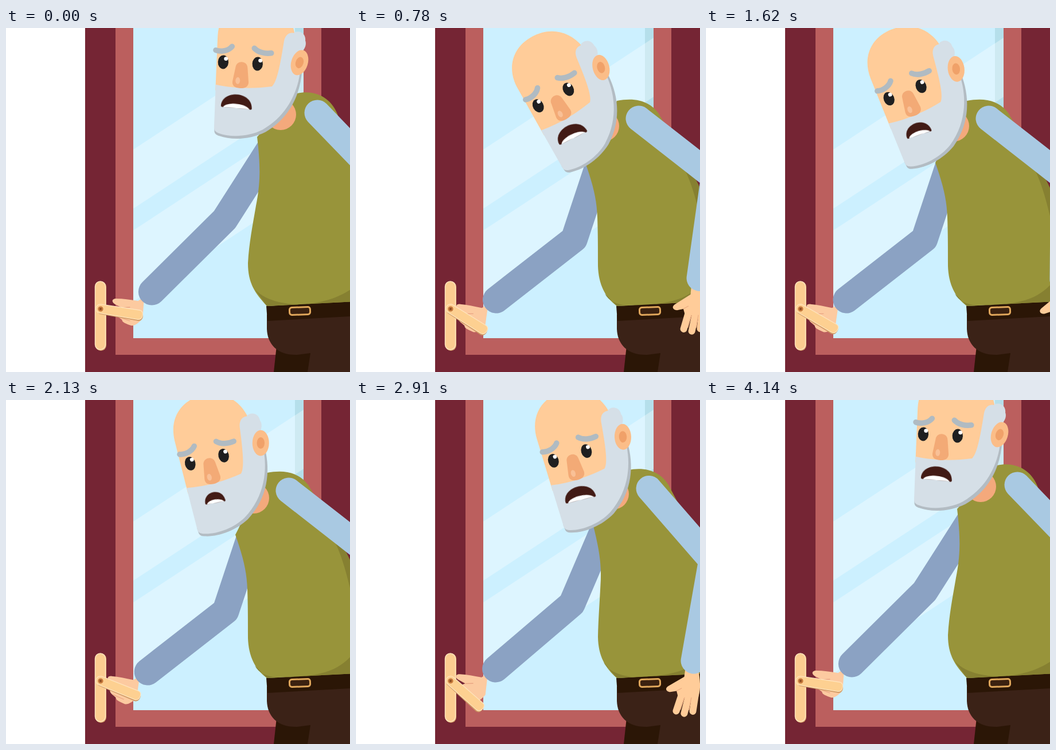
Recreate the animation shown at these times as an HTML page without scripts. Size 600 by 600 pixels, loop 4.17 s.

```html
<!DOCTYPE html>
<html lang="en">
<head>
<meta charset="utf-8">
<title>Man at the door</title>
<style>
/* Six animated controls drive the whole rig. */
@property --lean { syntax: "<number>"; inherits: true; initial-value: 0; }
@property --turn { syntax: "<number>"; inherits: true; initial-value: 1; }
@property --push { syntax: "<number>"; inherits: true; initial-value: 8.5; }
@property --nod { syntax: "<angle>"; inherits: true; initial-value: 3deg; }
@property --upper { syntax: "<angle>"; inherits: true; initial-value: 46deg; }
@property --fore { syntax: "<angle>"; inherits: true; initial-value: 88deg; }

@keyframes lean { 0%, 81%, 100% { --lean: 0 } 16.6%, 62% { --lean: 1 } }
@keyframes turn { 0%, 100% { --turn: 1 } 22%, 81% { --turn: 0 } }
@keyframes push { 0%, 81%, 100% { --push: 8.5 } 27% { --push: 38 } 51% { --push: 21.5 } 70% { --push: 41 } }
@keyframes nod { 0%, 100% { --nod: 3deg } 15%, 27% { --nod: -28.7deg } 51% { --nod: -13.6deg } 70% { --nod: -16.3deg } 81% { --nod: -1.9deg } }
@keyframes upper { 0%, 100% { --upper: 46deg } 15%, 52% { --upper: 38deg } 70%, 81% { --upper: 49deg } }
@keyframes fore { 0%, 100% { --fore: 87deg } 10%, 27% { --fore: 98deg } 51% { --fore: 83deg } 70%, 81% { --fore: 100deg } }

@keyframes torso {
  0%, 81%, 100% { d: path("M438 190C444 240 444 270 436 310C430 345 424 375 422 410C422 445 434 462 455 485L610 477L610 300L600 210L578 150C565 118 535 108 508 114Z") }
  16.6%, 62% { d: path("M400 235C414 275 420 300 421 330C422 360 422 385 422 415C423 448 435 470 455 485L610 477L610 300L580 238L527 148C510 126 485 121 455 127Z") }
}
@keyframes belly {
  0%, 81%, 100% { d: path("M428 447C445 477 490 483 520 482C560 478 585 468 610 450L610 477L455 485Z") }
  16.6%, 62% { d: path("M434 463C440 476 455 482 472 484C550 482 580 475 610 437L610 477L455 485Z") }
}
@keyframes reach {
  0%, 81%, 100% { d: path("M249 460L376 334L459 204") }
  16.6%, 62% { d: path("M245 474L381 368L434 208") }
}
@keyframes mouth { 0%, 27%, 70%, 100% { transform: none } 51% { transform: scale(.66, .8) } }

html, body { margin: 0; width: 100%; height: 100%; overflow: hidden; background: #fff; }
svg { display: block; width: 100vw; height: 100vh; }
svg, .morph { animation: 4.17s cubic-bezier(.37, 0, .63, 1) infinite; }
svg { animation-name: lean, turn, push, nod, upper, fore; }
.torso { animation-name: torso; fill: #98943a; }
.belly { animation-name: belly; }
.reach { animation-name: reach; stroke: #8ba2c3; stroke-width: 47; }
.mouth { animation-name: mouth; }

.grip { transform: translateX(calc((30 - var(--push)) * .25px)); }
.far-hand { transform: translate(calc(249px - 4px * var(--lean)), calc(460px + 14px * var(--lean))) rotate(calc(4deg * var(--lean))); }
.lever { transform: translate(165px, 490px) rotate(calc(var(--push) * 1deg)); }
.back { transform: translateX(calc(45px - 45px * var(--lean))); }
.arm { transform: translate(calc(543px - 50px * var(--lean)), calc(148px + 10px * var(--lean))) rotate(var(--upper)); }
.forearm { transform: translateX(166px) rotate(calc(var(--fore) - var(--upper))); }
.near-hand { transform: translateX(178px) rotate(-99deg); }
.neck { transform: translate(calc(479px - 47px * var(--lean)), calc(151px + 20px * var(--lean))); }
.head { transform: translate(calc(479.5px - 66.5px * var(--lean) - 14px * var(--turn)), calc(107px + 26px * var(--lean))) rotate(var(--nod)) translate(-54px, -43px); }
.face { transform: translateX(calc(-5px * var(--turn))); }

.limb, .brow, .finger { fill: none; stroke-linecap: round; stroke-linejoin: round; }
.sleeve { stroke: #a9c9e2; stroke-width: 45; }
.brow { stroke: #b0bbc2; stroke-width: 9.5; }
.finger { stroke: #ffcc99; stroke-width: 12; }
.skin { fill: #ffcc99; }
.blush { fill: #f3aa76; }
.shade { fill: #868031; }
.dark { fill: #2b1606; }
</style>
</head>
<body>
<svg viewBox="0 0 600 600">
  <defs>
    <g id="eye">
      <ellipse rx="9.2" ry="12" fill="#1f1f20"/>
      <circle cx="4.5" cy="-6" r="3.4" fill="#fff"/>
    </g>
  </defs>

  <!-- door -->
  <path fill="#752534" d="M138 0H600V600H138Z"/>
  <path fill="#bb5f5e" d="M191 0H550V570H191Z"/>
  <path fill="#ccf0ff" d="M222 0H519V541H222Z"/>
  <path fill="#b5dfeb" d="M504 0H519V541H504Z"/>
  <path fill="#fff" opacity=".33" d="M222 212L519 17V120L222 315ZM222 353L519 158V282L222 477Z"/>
  <rect x="156" y="442" width="19" height="121" rx="9.5" fill="#dba56c"/>
  <rect x="155.5" y="442" width="18" height="119" rx="9" fill="#fbcd90" stroke="#ffe4bd" stroke-width="1.5"/>

  <!-- far arm -->
  <g class="grip">
    <g class="far-hand">
      <path fill="#fccaa0" d="M-9 6L-24 16C-38 14 -50 12 -62 12C-70 12 -71 18 -64 22L-52 28C-64 32 -66 38 -60 43L-52 49C-52 54 -44 56 -36 59C-30 60 -22 54 -16 46L-14 18Z"/>
      <path fill="none" stroke="#e9a582" stroke-width="1.3" d="M-52 28L-38 27M-58 44L-38 51"/>
    </g>
    <path class="limb morph reach" d="M249 460L376 334L459 204"/>
  </g>

  <!-- lever -->
  <g class="lever">
    <path fill="#cf9963" d="M-1 -6H68Q75 -6 75 2T68 11L0 9A8 8 0 0 1 -1 -6Z"/>
    <path fill="#fdd091" stroke="#ffe4bd" stroke-width="1.3" d="M-1 -8H67Q74 -8 74 0T67 8.5L0 7.5A7.7 7.7 0 0 1 -1 -8Z"/>
    <circle r="4.6" fill="#c67a3d"/>
    <circle r="2" fill="#8a4a20"/>
  </g>

  <!-- trousers and belt -->
  <path class="dark" d="M473 545L467 600H540V545Z"/>
  <path fill="#3b2217" d="M455 500V525C456 552 474 571 508 570L531 567L526 600H600V490Z"/>
  <path class="dark" d="M454 485L600 476V503L456 511Z"/>
  <rect x="494.5" y="487" width="36" height="13" rx="4" fill="#3b2110" stroke="#dfa65b" stroke-width="3" transform="rotate(-2 512 493)"/>

  <!-- torso -->
  <path class="morph torso" d="M438 190C444 240 444 270 436 310C430 345 424 375 422 410C422 445 434 462 455 485L610 477L610 300L600 210L578 150C565 118 535 108 508 114Z"/>
  <path class="morph belly shade" d="M428 447C445 477 490 483 520 482C560 478 585 468 610 450L610 477L455 485Z"/>
  <path class="back shade" d="M566 232C584 265 592 295 601 332L610 300L580 238Z"/>

  <!-- near arm -->
  <g class="arm">
    <g class="forearm">
      <g class="near-hand">
        <path class="skin" d="M-14 10L-16 28L-44 45C-50 49 -47 55 -40 55L-29 53L-26 64L8 66C14 50 12 36 8 12Z"/>
        <path class="finger" d="M-19 56L-29 88M-7 58L-15 92M4 58L0 88"/>
        <path fill="none" stroke="#eeb084" stroke-width="1.4" d="M-15 64L-22 86M-3 64L-7 86M-29 53L-20 48"/>
      </g>
      <path class="limb sleeve" d="M0 0H178"/>
    </g>
    <path class="limb sleeve" d="M0 0H166"/>
  </g>

  <circle class="neck" r="27" fill="#f4a97c"/>

  <!-- head, centred between the eyes -->
  <g class="head">
    <path fill="#b3bcc3" d="M-45 112L-44 122C-43 126 -40 128 -35 129C-12 136 20 132 45 118C88 90 103 46 103 5H80L0 100Z"/>
    <path class="skin" d="M-46 50L-47 -45C-47 -85 -20 -111 18 -111C55 -111 80 -88 87 -55V50Z"/>
    <path fill="#d5dfe7" d="M-46 40C-10 46 25 43 52 38C60 30 64 5 69 -42C71 -54 78 -58 85 -57C93 -64 107 -58 106 -45C109 -38 106 -30 100 -24V5C99 40 84 86 40 114C16 128 -16 131 -37 124C-43 122 -45 119 -45 114Z"/>
    <g transform="translate(98 -6) rotate(14)">
      <ellipse rx="14.5" ry="22.5" fill="#fbbd88"/>
      <ellipse rx="6.8" ry="10" fill="#f0a169"/>
    </g>
    <g class="face">
      <use href="#eye" x="-30"/>
      <use href="#eye" x="30"/>
      <path class="brow" d="M-44 -20C-35 -17 -22 -20 -16 -28M23 -27C30 -20 42 -18 53 -20"/>
      <path class="blush" d="M-8 8C-7 -5 12 -5 13 8L16 33C16 41 10 44 2 44C-8 44 -13 40 -12 32Z"/>
      <ellipse cx="-3" cy="31" rx="4" ry="6" fill="#f9c096"/>
      <g transform="translate(-3 68)">
        <g class="morph mouth">
          <path fill="#421b15" d="M-27 8C-26 -20 26 -20 27 10Q27 14 22 12L-22 10Q-27 11 -27 8Z"/>
          <path fill="#fff" d="M-23 10C-18 1 14 1 23 12Z"/>
        </g>
      </g>
    </g>
  </g>
</svg>
</body>
</html>
```
